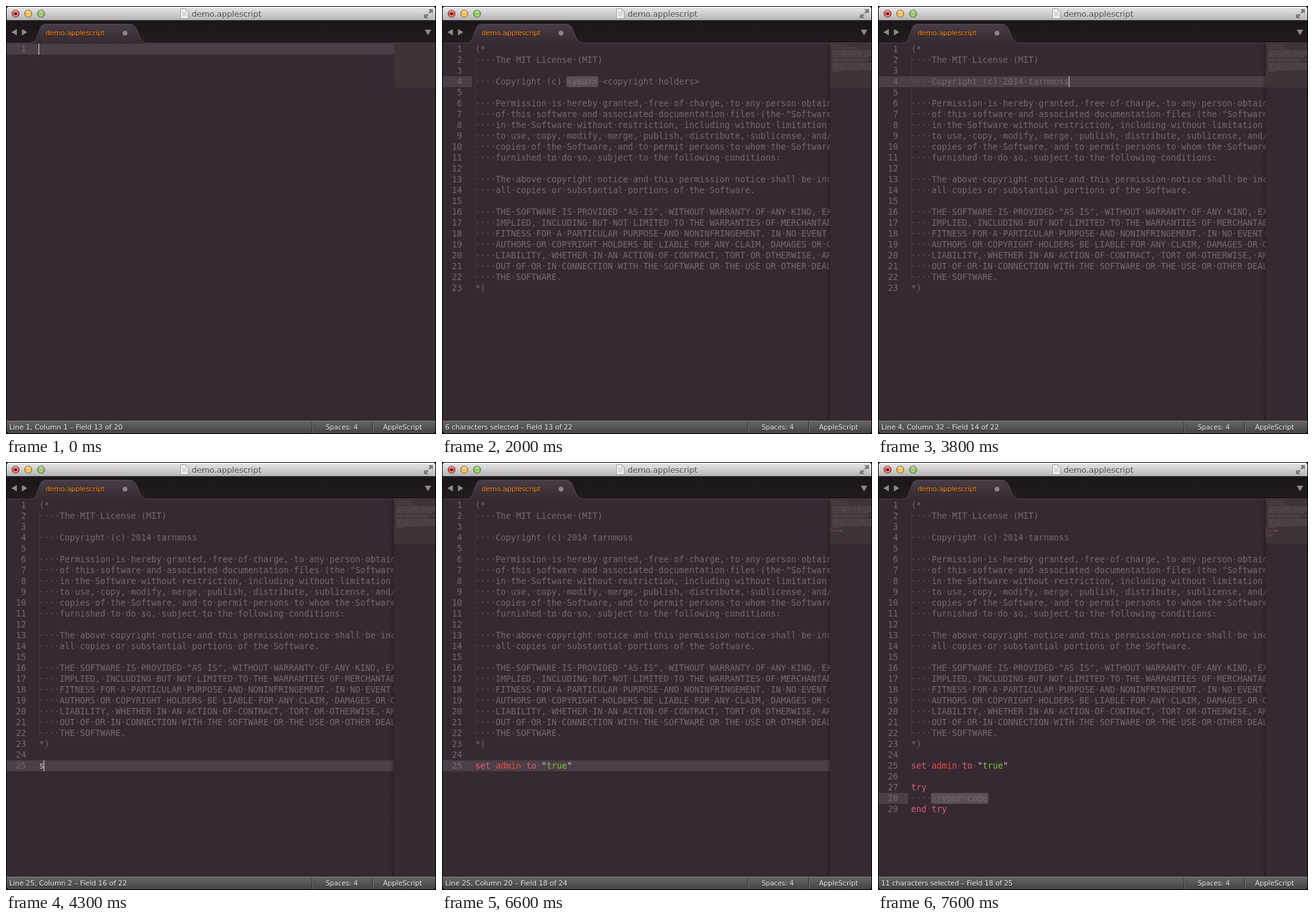
Write an HTML page that moves like this. It is 674 px wide and 670 px high and loops after 8 s.

```html
<!DOCTYPE html>
<html lang="en">
<head>
<meta charset="utf-8">
<title>demo.applescript</title>
<style>
html, body { margin: 0; width: 100%; height: 100%; overflow: hidden; background: #000; }
svg { display: block; }
text { white-space: pre; }
.code { font: 13.288px "DejaVu Sans Mono", "Liberation Mono", monospace; }
.ui { font: 10.67px "DejaVu Sans", "Open Sans", sans-serif; }
.status { fill: #f4f4f4; text-shadow: 0 1px 1px #222; }
</style>
</head>
<body>
<svg width="674" height="670" viewBox="0 0 674 670">
  <defs>
    <linearGradient id="title" x2="0" y2="1"><stop stop-color="#ececec"/><stop offset="1" stop-color="#b2b2b2"/></linearGradient>
    <linearGradient id="bar" x2="0" y2="1"><stop stop-color="#1b1619"/><stop offset="1" stop-color="#221b1f"/></linearGradient>
    <linearGradient id="tab" x2="0" y2="1"><stop stop-color="#483d44"/><stop offset="1" stop-color="#362b32"/></linearGradient>
    <linearGradient id="foot" x2="0" y2="1"><stop stop-color="#666"/><stop offset="1" stop-color="#434343"/></linearGradient>
    <linearGradient id="edge"><stop stop-color="#000" stop-opacity="0"/><stop offset="1" stop-color="#000" stop-opacity=".25"/></linearGradient>
    <linearGradient id="gloss" x2="0" y2="1"><stop stop-color="#fff" stop-opacity=".75"/><stop offset=".5" stop-color="#fff" stop-opacity=".1"/><stop offset="1" stop-color="#fff" stop-opacity=".5"/></linearGradient>
    <clipPath id="win"><rect x="1" y="1" width="672" height="668" rx="4"/></clipPath>
    <clipPath id="page"><rect x="1" y="58" width="607" height="591"/></clipPath>
  </defs>
  <g clip-path="url(#win)">
    <rect width="674" height="670" fill="#352a31"/>

    <rect width="674" height="23" fill="url(#title)"/>
    <path d="M1 1.5H673" stroke="#f8f8f8"/>
    <g id="lights"></g>
    <path d="M273.5 4.5H282L285.500 8V19.500H273.500Z" fill="#eee" stroke="#a5a5a5"/>
    <path d="M282 4.500V8H285.500M276 10H283M276 12.500H283M276 15H283" fill="none" stroke="#b8b8b8"/>
    <text x="291" y="17" fill="#484848" style="font:12.6px 'DejaVu Sans','Open Sans',sans-serif;text-shadow:0 1px 0 #eee">demo.applescript</text>
    <path d="M662 5H669V12L666.500 9.500L664 12L662 10L664.500 7.500ZM662 19H655V12L657.500 14.500L660 12L662 14L659.500 16.500Z" fill="#777"/>

    <rect y="23" width="674" height="34" fill="url(#bar)"/>
    <path d="M0 22.500H674" stroke="#3a3638"/>
    <path d="M0 56.500H674" stroke="#0e0b0d"/>
    <path d="M0 57.500H674" stroke="#50444c"/>
    <path d="M39 58C45 57 46.500 54 48.500 49L53.500 35Q56 28.500 62 28.500H194Q201 28.500 204 35L210 49C212 54 214 57 220 58Z" fill="url(#tab)"/>
    <path d="M39 57.500C45 57 46.500 54 48.500 49L53.500 35Q56 28.500 62 28.500H194Q201 28.500 204 35L210 49C212 54 214 57 220 57.500" fill="none" stroke="#594c54"/>
    <path d="M17 36V46L8.500 41ZM25 36V46L33.500 41ZM656.500 37H666.500L661.500 46Z" fill="#8d888a"/>
    <text class="ui" x="62" y="46" fill="#ff921f" style="text-shadow:0 1px 1px #000">demo.applescript</text>
    <circle cx="186.500" cy="42.500" r="3.700" fill="#8d8589"/>

    <rect x="608" y="58" width="65" height="70" fill="#3e3337"/>
    <g id="view"></g>

    <rect y="649" width="674" height="21" fill="url(#foot)"/>
    <path d="M0 648.500H674" stroke="#2a2227"/>
    <path d="M0 649.500H674" stroke="#7b7b7b"/>
    <path d="M479.500 650V669M574.500 650V669" stroke="#333"/>
    <path d="M480.500 650V669M575.500 650V669" stroke="#707070"/>
    <text id="info" class="ui status" x="5" y="663"></text>
    <text class="ui status" x="501" y="663" style="font-size:10.35px">Spaces: 4</text>
    <text class="ui status" x="591" y="663">AppleScript</text>
  </g>
</svg>
<script>
const LOOP = 8000, LEFT = 52, TOP = 59, CHAR = 8, ROW = 17;
const COLOR = { note: '#776a72', plain: '#cdc3c8', key: '#e25a7d', name: '#f4464c', str: '#7fc03c', dot: '#635760' };
const HOLDER = 'tarnmoss';
const byId = id => document.getElementById(id);
const esc = s => s.replace(/&/g, '&amp;').replace(/</g, '&lt;').replace(/>/g, '&gt;');

const TERMS = `Permission is hereby granted, free of charge, to any person obtaining a copy
of this software and associated documentation files (the "Software"), to deal
in the Software without restriction, including without limitation the rights
to use, copy, modify, merge, publish, distribute, sublicense, and/or sell
copies of the Software, and to permit persons to whom the Software is
furnished to do so, subject to the following conditions:

The above copyright notice and this permission notice shall be included in
all copies or substantial portions of the Software.

THE SOFTWARE IS PROVIDED "AS IS", WITHOUT WARRANTY OF ANY KIND, EXPRESS OR
IMPLIED, INCLUDING BUT NOT LIMITED TO THE WARRANTIES OF MERCHANTABILITY,
FITNESS FOR A PARTICULAR PURPOSE AND NONINFRINGEMENT. IN NO EVENT SHALL THE
AUTHORS OR COPYRIGHT HOLDERS BE LIABLE FOR ANY CLAIM, DAMAGES OR OTHER
LIABILITY, WHETHER IN AN ACTION OF CONTRACT, TORT OR OTHERWISE, ARISING FROM,
OUT OF OR IN CONNECTION WITH THE SOFTWARE OR THE USE OR OTHER DEALINGS IN
THE SOFTWARE.`;

function license(year, holder) {
  const body = ['The MIT License (MIT)', '', `Copyright (c) ${year} ${holder}`, '', ...TERMS.split('\n')];
  return ['(*', ...body.map(s => s && '    ' + s), '*)'];
}

// Timeline of editor states
const states = [];
function add(at, lines, row, col, field, sel = 0) {
  states.push({ at, lines, row, col, field, sel, caret: !sel && at < 5000 });
}
function type(at, word, show) {
  for (let i = 1; i <= word.length; i++) show(at + (i - 1) * 100, word.slice(0, i), i);
}

add(0, [''], 1, 1, '13 of 20');
type(1000, 'commit', (t, s, n) => add(t, [s], 1, n + 1, '13 of 20'));
add(2000, license('<year>', '<copyright holders>'), 4, 19, '13 of 22', 6);
type(2500, '2014', (t, s, n) => add(t, license(s, '<copyright holders>'), 4, 19 + n, '13 of 22'));
add(3000, license('2014', '<copyright holders>'), 4, 24, '14 of 22', 19);
type(3100, HOLDER, (t, s, n) => add(t, license('2014', s), 4, 24 + n, '14 of 22'));

const head = license('2014', HOLDER);
const assign = (name, value) => [...head, '', `set ${name} to "${value}"`];
add(3900, head, 23, 3, '16 of 22');
add(4000, [...head, ''], 24, 1, '16 of 22');
add(4100, [...head, '', ''], 25, 1, '16 of 22');
type(4300, 'set', (t, s, n) => add(t, [...head, '', s], 25, n + 1, '16 of 22'));
add(5000, assign('variable', 'string'), 25, 5, '16 of 24', 8);
type(5500, 'admin', (t, s, n) => add(t, assign(s, 'string'), 25, 5 + n, '16 of 24'));
add(6100, assign('admin', 'string'), 25, 15, '17 of 24', 6);
type(6200, 'true', (t, s, n) => add(t, assign('admin', s), 25, 15 + n, '17 of 24'));

const done = assign('admin', 'true');
add(6600, done, 25, 20, '18 of 24');
add(6700, [...done, ''], 26, 1, '18 of 24');
add(6800, [...done, '', ''], 27, 1, '18 of 24');
type(6900, 'try', (t, s, n) => add(t, [...done, '', s], 27, n + 1, '18 of 24'));
add(7600, [...done, '', 'try', '    --your code', 'end try'], 28, 5, '18 of 25', 11);

function tokens(line, comment) {
  if (comment || /^\s*--/.test(line)) return [[line, 'note']];
  const m = line.match(/^set (\w+) to "(\w*)"$/);
  if (m) return [['set ', 'key'], [m[1], 'name'], [' to ', 'key'], ['"', 'plain'], [m[2], 'str'], ['"', 'plain']];
  return [[line, /^(set|try|end try)$/.test(line) ? 'key' : 'plain']];
}

const rect = (x, y, w, h, fill, more = '') => `<rect x="${x}" y="${y}" width="${w}" height="${h}" fill="${fill}" ${more}/>`;
const text = (x, y, s, fill, more = '') => `<text class="code" x="${x}" y="${y}" fill="${fill}" ${more}>${esc(s)}</text>`;

function draw(s) {
  const isLong = s.lines.length > 1;
  const y0 = TOP + (s.row - 1) * ROW, x0 = LEFT + (s.col - 1) * CHAR;
  let page = rect(1, y0, s.sel ? 46 : 607, ROW, '#4b4047');
  let map = '';
  if (s.sel) page += rect(x0 - 1, y0, s.sel * CHAR + 2, ROW, '#5a5057', 'rx="3"');
  if (isLong) page += '<path d="M52.500 76V433" stroke="#51454d" stroke-dasharray="1 1"/>';

  s.lines.forEach((line, i) => {
    const base = TOP + 13 + i * ROW;
    page += text(31.5, base, String(i + 1), COLOR.note, 'text-anchor="end"');
    const dots = line.replace(/\S/g, ' ').split('').map((c, k) => line[k] === ' ' ? '·' : ' ').join('');
    if (dots.trim()) page += text(LEFT, base, dots, COLOR.dot);
    let col = 0;
    for (const [str, kind] of tokens(line, isLong && i < 23)) {
      if (str) page += text(LEFT + col * CHAR, base, str, COLOR[kind]);
      for (const m of str.matchAll(/\S+/g)) {
        const x = col + m.index, w = Math.min(m[0].length, 65 - x);
        if (w > 0) map += rect(608 + x, TOP + i * 2, w, 1.2, COLOR[kind]);
      }
      col += str.length;
    }
  });

  if (s.caret) page += rect(x0 - 1, y0, 1, ROW, '#ddd5d9');
  if (isLong) page += rect(602, 58, 6, 591, 'url(#edge)');
  byId('view').innerHTML = `<g clip-path="url(#page)">${page}</g><g opacity=".5">${map}</g>`;

  const info = byId('info');
  info.textContent = (s.sel ? `${s.sel} characters selected` : `Line ${s.row}, Column ${s.col}`) + ` – Field ${s.field}`;
  info.style.fontSize = s.sel ? '10.66px' : '10.87px';
}

byId('lights').innerHTML = ['#e8483f', '#f0b33c', '#7dbb48'].map((c, i) => {
  const x = 15 + i * 20;
  return `<circle cx="${x}" cy="12" r="5.700" fill="${c}" stroke="#000" stroke-opacity=".45"/>` +
    `<ellipse cx="${x}" cy="12" rx="4" ry="4.800" fill="url(#gloss)"/>`;
}).join('') + '<circle cx="15" cy="12" r="2.200" fill="#4a0906"/>';

let shown = null;
const start = performance.now();
function tick() {
  const t = (performance.now() - start) % LOOP;
  const s = states.findLast(v => v.at <= t) || states[0];
  if (s !== shown) draw(shown = s);
  requestAnimationFrame(tick);
}
tick();
</script>
</body>
</html>
```
